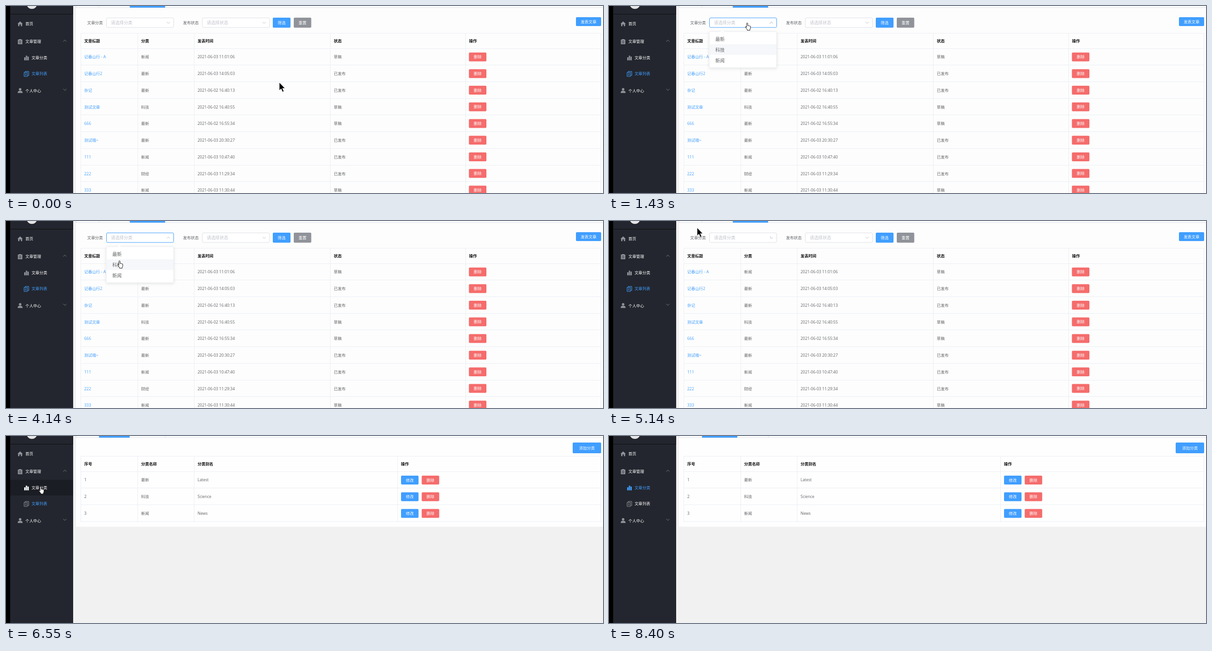
Recreate the animation shown at these times as an HTML page. Size 1280 px wide and 401 px high, loop 9.05 s.

```html
<!DOCTYPE html>
<html lang="zh-CN">
<head>
<meta charset="utf-8">
<title>文章管理</title>
<style>
  html, body { margin: 0; width: 100%; height: 100%; overflow: hidden; background: #f1f1f1; }
  svg { display: block; width: 100%; height: 100%; }
  text { font: 8.45px "Open Sans", "Noto Sans CJK SC", "Noto Sans CJK", sans-serif; white-space: pre; }
  .head { font-weight: 700; }
  .medium { font-weight: 500; }
</style>
</head>
<body>
<svg id="stage" viewBox="0 0 1280 401" preserveAspectRatio="none"></svg>
<script>
const LOOP = 9050, OPEN = 1170, CLOSE = 4910, SWITCH = 6550;
const BLUE = '#409eff', RED = '#f56c6c', GRAY = '#909399', INK = '#606266', LINE = '#ebeef5';

const rect = (x, y, w, h, fill, more = '') =>
  `<rect x="${x}" y="${y}" width="${w}" height="${h}" fill="${fill}" ${more}/>`;
const path = (d, stroke, more = '') =>
  `<path d="${d}" fill="none" stroke="${stroke}" ${more}/>`;
// y is the visual middle of the line
const text = (s, x, y, fill = INK, more = '') =>
  `<text x="${x}" y="${y + 3.1}" fill="${fill}" ${more}>${s}</text>`;
const button = (s, x, y, w, h, fill) =>
  rect(x, y, w, h, fill, 'rx="2"') +
  text(s, x + w / 2, y + h / 2, '#fff', 'class="medium" text-anchor="middle"');

function table(cols, top, heads, rows, cell) {
  const head = top + 33, step = 35.72;
  const bottom = head + rows.length * step;
  let lines = `M160 ${top}H1276M160 ${head}H1276`;
  let out = '';
  for (const x of [...cols, 1275.5]) lines += `M${x} ${top}V${bottom}`;
  heads.forEach((h, i) => out += text(h, cols[i] + 7.3, top + 16.7, '#111', 'class="head"'));
  rows.forEach((row, r) => {
    const y = head + (r + .5) * step;
    lines += `M160 ${Math.round(head + (r + 1) * step) - .5}H1276`;
    row.forEach((s, i) => out += text(s, cols[i] + 7.3, y, cell(i)));
  });
  return path(lines, LINE) + out;
}

function select(id, label, hint, x) {
  return text(label, x - 41, 35.5) +
    rect(x + .5, 25.5, 144, 20.5, '#fff', `id="${id}" rx="2.5" stroke="#dcdfe6"`) +
    `<text x="${x + 10}" y="38.8" fill="#c0c4cc" style="font-size:9.2px">${hint}</text>` +
    path('M-3.5-1.8L0 1.8L3.5-1.8', '#c0c4cc', `id="${id}Arrow" transform="translate(${x + 133} 35.8)"`);
}

function articlePage() {
  const rows = [
    ['记春山行 - A', '新闻', '2021-06-03 11:01:06', '草稿'],
    ['记春山行2', '最新', '2021-06-03 14:05:03', '已发布'],
    ['杂记', '最新', '2021-06-02 16:40:13', '已发布'],
    ['测试文章', '科技', '2021-06-02 16:40:55', '草稿'],
    ['666', '最新', '2021-06-02 16:55:34', '草稿'],
    ['测试哦~', '最新', '2021-06-03 20:30:27', '已发布'],
    ['111', '新闻', '2021-06-03 10:47:40', '已发布'],
    ['222', '财经', '2021-06-03 11:29:34', '已发布'],
    ['333', '新闻', '2021-06-03 11:30:44', '草稿']
  ];
  return rect(150, 4, 1130, 397, '#fdfdfd') +
    select('kind', '文章分类', '请选择分类', 215) +
    select('state', '发布状态', '请选择状态', 420.5) +
    button('筛选', 572, 25, 38, 21.5, BLUE) +
    button('重置', 617, 25, 37.5, 21.5, GRAY) +
    button('发表文章', 1222, 24, 54, 19, BLUE) +
    table([160.5, 282.5, 403.5, 695.5, 985.5], 58.5,
      ['文章标题', '分类', '发表时间', '状态', '操作'], rows, i => i ? INK : BLUE) +
    rows.map((_, r) => button('删除', 992.5, 99.7 + r * 35.7, 37.5, 19, RED)).join('');
}

function kindPage() {
  const rows = [['1', '最新', 'Latest'], ['2', '科技', 'Science'], ['3', '新闻', 'News']];
  return rect(150, 4, 1130, 190.5, '#fefefe') +
    button('添加分类', 1215, 14, 61, 23, BLUE) +
    table([160.5, 282.5, 403.5, 839.5], 43.5, ['序号', '分类名称', '分类别名', '操作'], rows, () => INK) +
    rows.map((_, r) => button('修改', 847, 85 + r * 35.7, 37.5, 19, BLUE) +
      button('删除', 891.3, 85 + r * 35.7, 37.5, 19, RED)).join('');
}

function sidebar() {
  const item = (s, x, y, id) => text(s, x, y, '#fff', `class="medium" id="${id}"`);
  return rect(0, 0, 9, 401, '#000') + rect(9, 0, 135, 401, '#23262e') +
    path('M9 17.5H143.5V0', '#0d0e11') +
    '<circle cx="55.5" cy="-5" r="11.3" fill="#e4e4e4"/>' +
    rect(9, 94, 135, 33.5, '#1b1d24', 'id="hover"') +
    `<path d="M30.3 33L36 38.2H34.6V43.3H31.8V39.5H28.8V43.3H26V38.2H24.6Z" fill="${GRAY}"/>` +
    `<path d="M25.5 72H28V71H32.5V72H35V82H25.5Z" fill="${GRAY}"/>` +
    path('M27.5 74.7H33M27.5 77H33M27.5 79.3H33', '#23262e', 'stroke-width=".8"') +
    '<path id="bars" d="M39 110H41.8V116.5H39ZM42.5 106.5H45.3V116.5H42.5ZM46 108.5H48.8V116.5H46Z"/>' +
    path('M38.8 142.5H46V151H38.8ZM41 142V140.3H48.8V149H46.3M40.7 145.5H44M40.7 148H44', GRAY, 'id="pages"') +
    `<circle cx="30.3" cy="178.7" r="2.7" fill="${GRAY}"/><path d="M25 186.5Q25 182 28.5 182H32Q35.6 182 35.6 186.5Z" fill="${GRAY}"/>` +
    path('M122.8 76.3L126.2 73L129.6 76.3M122.8 177.8L126.2 181L129.6 177.8', '#83868c', 'stroke-width=".9"') +
    item('首页', 41.5, 38.3, 'home') + item('文章管理', 41.5, 76.3, 'manage') +
    item('文章分类', 54.7, 111, 'menuKind') + item('文章列表', 54.7, 144.7, 'menuList') +
    item('个人中心', 41.5, 181.7, 'mine');
}

const options = ['最新', '科技', '新闻'].map((s, i) =>
  `<text x="228" y="${74.6 + i * 23}" fill="${INK}" style="font-size:10px">${s}</text>`).join('');

document.getElementById('stage').innerHTML =
  '<defs><filter id="shade" x="-20%" y="-20%" width="140%" height="150%">' +
  '<feDropShadow dx="0" dy="1.4" stdDeviation="3" flood-color="#000" flood-opacity=".1"/></filter></defs>' +
  rect(0, 0, 1280, 401, '#f1f1f1') + rect(144, 0, 6, 401, '#f2f0f1') + rect(150, 0, 1130, 4, '#fdfdfd') +
  path('M150 3.5H1280M150.5 0V3', '#e0e3e8') + path('', '#e0e3e8', 'id="tabLines"') +
  rect(265, 0, 76, 3.5, BLUE, 'id="tab"') +
  `<g id="articles">${articlePage()}</g><g id="kinds">${kindPage()}</g>` +
  '<g id="menu">' + rect(215, 55, 144.5, 77.5, '#fff', 'rx="2.5" stroke="#e4e7ed" stroke-width=".8" filter="url(#shade)"') +
  '<path d="M239 55.5L243.2 51.3L247.4 55.5Z" fill="#fff"/>' +
  rect(215.4, 82, 143.7, 23, '#f5f7fa', 'id="mark"') + options + '</g>' +
  sidebar() +
  '<path id="arrow" d="M0 0V17L3.9 13.4L6.9 20.2L9.7 19L6.8 12.4H12Z" fill="#000" stroke="#fff" stroke-width=".7"/>' +
  '<path id="hand" d="M-1 10V1.7a1.3 1.3 0 0 1 2.6 0V6.2q1.2-.8 2 .2q1.2-.6 1.9.4q1.7-.4 1.8 1.2v3q0 2-1.2 3.2v2H.4v-1.6Q-1.8 12-3.4 9.6q-.6-1.2.4-1.4q1-.1 2 1.8z" fill="#fff" stroke="#000" stroke-width=".9"/>';

const el = {};
document.querySelectorAll('[id]').forEach(e => el[e.id] = e);
const set = (id, name, value) => el[id].setAttribute(name, value);
const show = (id, on) => set(id, 'display', on ? 'inline' : 'none');

const clamp = v => Math.max(0, Math.min(1, v));
const part = (t, from, length) => clamp((t - from) / length);
const smooth = k => k * k * (3 - 2 * k);
const easeOut = k => 1 - (1 - k) ** 5;
const mix = (a, b, k) => a + (b - a) * k;
const blend = (a, b, k) => `rgb(${a.map((v, i) => Math.round(mix(v, b[i], k)))})`;
const WHITE_RGB = [255, 255, 255], BLUE_RGB = [64, 158, 255];

// Each stroke: start, end, then the points passed through
const strokes = [
  [150, 830, [586, 164], [296, 36]],
  [1670, 2540, [296, 36], [268, 72], [241, 115]],
  [2850, 3770, [241, 115], [255, 99], [242, 64], [221, 76], [228, 98], [243, 85]],
  [4140, 4710, [243, 85], [189, 14.5]],
  [5270, 5740, [189, 14.5], [74, 108]],
  [6970, 7430, [74, 108], [282, 106]],
  [7430, 8000, [282, 106], [329, 183], [301, 137]],
  [8200, 8400, [301, 137], [620, 412]]
];

function spline(points, k) {
  const u = k * (points.length - 1), i = Math.min(Math.floor(u), points.length - 2), f = u - i;
  const at = n => points[Math.max(0, Math.min(points.length - 1, n))];
  return [0, 1].map(c => {
    const a = at(i - 1)[c], b = at(i)[c], d = at(i + 1)[c], e = at(i + 2)[c];
    return b + .5 * f * (d - a + f * (2 * a - 5 * b + 4 * d - e + f * (3 * (b - d) + e - a)));
  });
}

function pointer(t) {
  let now = strokes[0];
  for (const s of strokes) if (t >= s[0]) now = s;
  const [from, to, ...points] = now;
  return spline(points, smooth(part(t, from, to - from)));
}

const inside = (x, y, l, t, r, b) => x >= l && x <= r && y >= t && y <= b;

function draw(t) {
  const [x, y] = pointer(t);
  const open = t >= OPEN && t < CLOSE, second = t >= SWITCH;
  const turn = smooth(part(t, OPEN, 300)) - smooth(part(t, CLOSE, 300));
  const drop = easeOut(part(t, OPEN, 300)) - easeOut(part(t, CLOSE, 230));

  show('articles', !second);
  show('kinds', second);
  set('kind', 'stroke', open ? BLUE : '#dcdfe6');
  set('kindArrow', 'transform', `translate(348 35.8) rotate(${180 * turn})`);

  show('menu', drop > .001);
  set('menu', 'opacity', drop);
  set('menu', 'transform', `translate(0 ${55 * (1 - drop)}) scale(1 ${drop})`);
  const over = Math.floor((y - 59) / 23);
  const row = t >= 1670 && over >= 0 && over < 3 ? over : t < 2000 ? 1 : 0;
  set('mark', 'y', 59 + 23 * row);

  const k = smooth(part(t, SWITCH, 300));
  const edge = second ? mix(265, 275, k) : 265;
  set('tab', 'x', second ? 199.5 : 265.5);
  set('tab', 'width', second ? edge - 199.5 : 75.5);
  set('tabLines', 'd', `M199.5 0V3M${edge} 0V3M341.5 0V3`);

  const hover = inside(x, y, 9, 94, 144, 127.5);
  show('hover', hover);
  set('bars', 'fill', second ? blend(hover ? WHITE_RGB : BLUE_RGB, BLUE_RGB, k) : hover ? '#fff' : GRAY);
  set('pages', 'stroke', second ? GRAY : BLUE);
  set('menuKind', 'fill', blend(WHITE_RGB, BLUE_RGB, k));
  set('menuList', 'fill', blend(BLUE_RGB, WHITE_RGB, k));

  const hand = inside(x, y, 9, 20, 144, 200) ||
    !second && (inside(x, y, 215, 25, 360, 47) || inside(x, y, 420, 25, 565, 47)) ||
    open && inside(x, y, 215, 55, 360, 132);
  const seen = t < 8400;
  show('hand', seen && hand);
  show('arrow', seen && !hand);
  set(hand ? 'hand' : 'arrow', 'transform', `translate(${x} ${y})`);
}

const start = performance.now();
function frame() {
  draw((performance.now() - start) % LOOP);
  requestAnimationFrame(frame);
}
frame();
</script>
</body>
</html>
```
